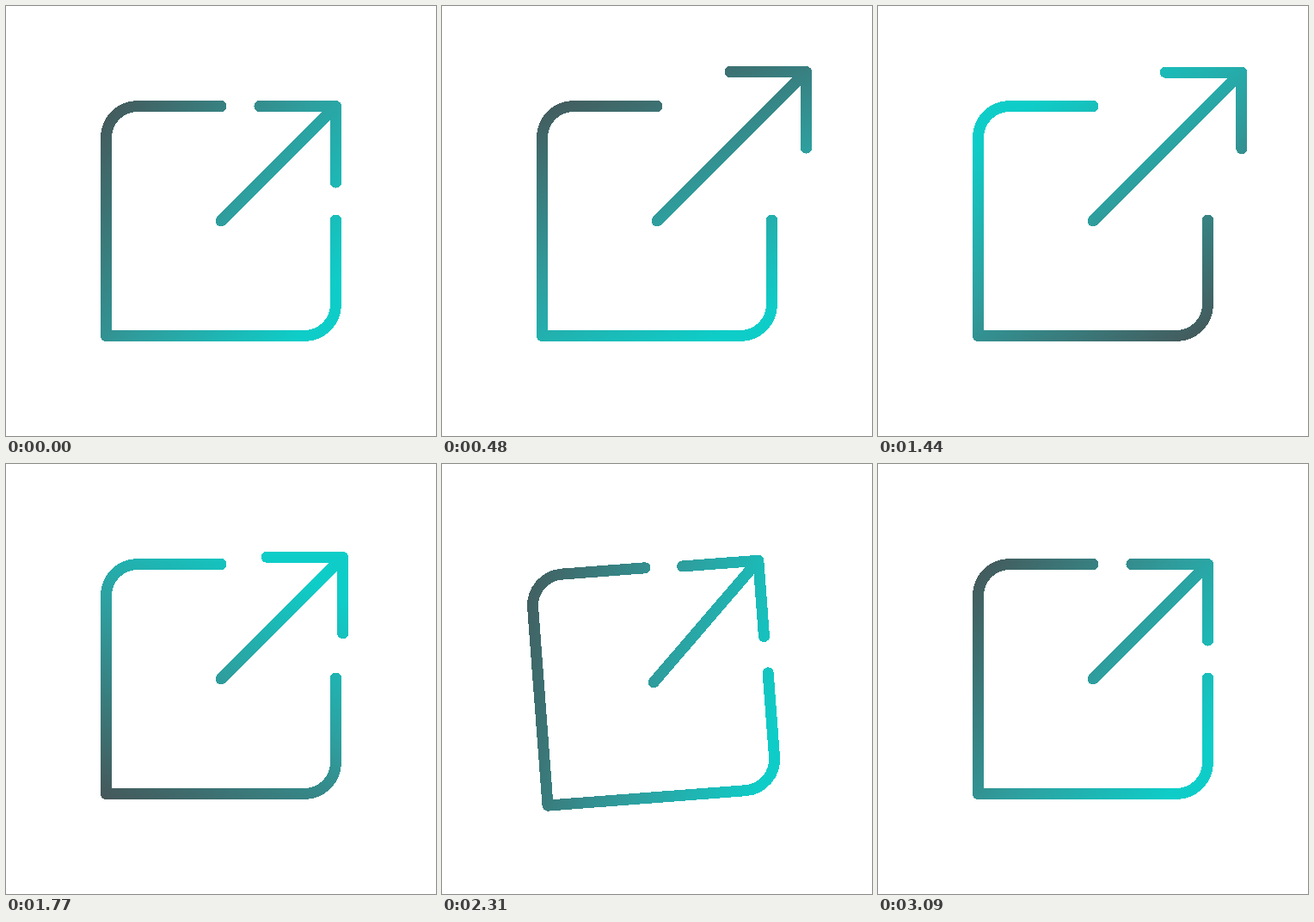
An HTML page for the animation above (3120 ms loop, 500 px wide and 500 px high).

```html
<!DOCTYPE html>
<html lang="en">
<head>
<meta charset="utf-8">
<title>Open link icon</title>
<style>
  html, body { margin: 0; width: 100%; height: 100%; overflow: hidden; background: #fff; }
  svg { display: block; width: 100vw; height: 100vh; }
</style>
</head>
<body>
<svg viewBox="0 0 500 500" shape-rendering="crispEdges">
  <defs>
    <linearGradient id="tint" gradientUnits="userSpaceOnUse" x1="440" y1="250" x2="60" y2="250">
      <stop offset="0" stop-color="#455759"/>
      <stop offset=".5" stop-color="#2f9d9d"/>
      <stop offset=".9" stop-color="#0ecdc8"/>
    </linearGradient>
  </defs>
  <g id="icon" fill="none" stroke="url(#tint)" stroke-width="13" stroke-linecap="round" stroke-linejoin="round">
    <path d="M250 116.5H153A36.5 36.5 0 0 0 116.5 153V383.5H347A36.5 36.5 0 0 0 383.5 347V249"/>
    <path id="arrow"/>
  </g>
</svg>
<script>
const LOOP = 3120, STEP = 30;
const [tint, icon, arrow] = ['tint', 'icon', 'arrow'].map(id => document.getElementById(id));

// Progress through a span of time, held at 0 before and 1 after
const span = (t, from, to) => Math.min(1, Math.max(0, (t - from) / (to - from)));
// Smooth rise from 0 to 1
const ease = (...args) => (1 - Math.cos(Math.PI * span(...args))) / 2;
// Smooth rise to 1 and back to 0
const bump = (...args) => Math.sin(Math.PI * span(...args)) ** 2;

function draw(t) {
  const angle = 216 + 360 * ease(t, 0, 2700);
  const rebound = bump(t, 2280, 2940);
  // Recoil points to the lower left, the arrow's reach to the upper right
  const recoil = 10 * bump(t, 0, 450) + 7 * bump(t, 1810, 2500) - 6.6 * rebound;
  const tilt = 0.5 * rebound - 6 * bump(t, 1975, 2470);
  const reach = 40 * (ease(t, 210, 450) - ease(t, 1540, 1870))
    - 1.2 * bump(t, 600, 1800) - 10 * bump(t, 1740, 2390);

  tint.setAttribute('gradientTransform', `rotate(${angle} 250 250)`);
  icon.setAttribute('transform', `translate(${-recoil} ${recoil}) rotate(${tilt} 250 250)`);
  const x = 383.5 + reach, y = 116.5 - reach;
  arrow.setAttribute('d', `M250 250L${x} ${y}M${x - 88.5} ${y}H${x}V${y + 88.5}`);
}

const start = performance.now();
function tick() {
  const t = (performance.now() - start) % LOOP;
  draw(Math.floor(t / STEP) * STEP);
  requestAnimationFrame(tick);
}
tick();
</script>
</body>
</html>
```
